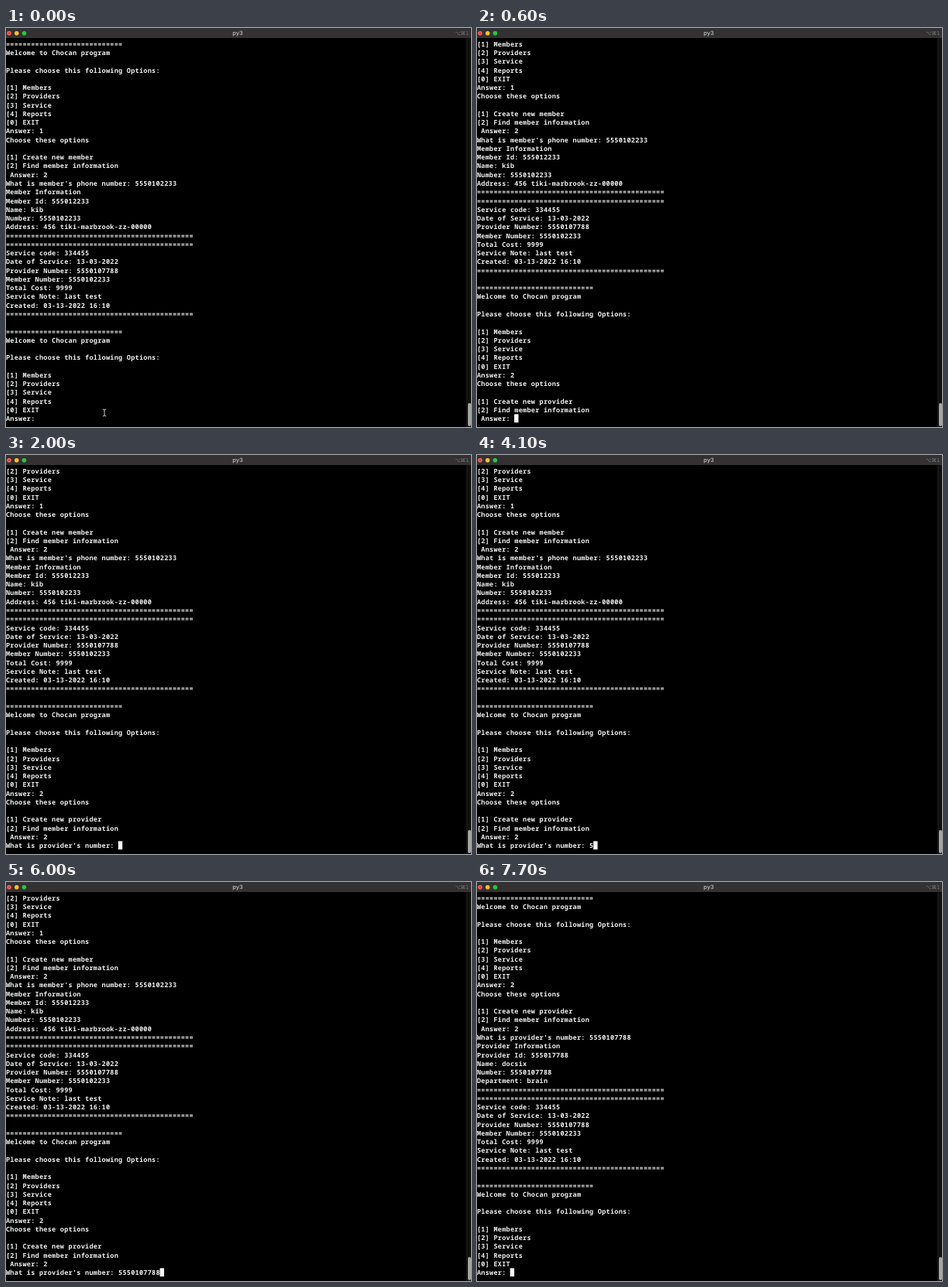
An HTML page that plays this animation: 600x516 px, repeating every 8 s.

```html
<!DOCTYPE html>
<html lang="en">
<head>
<meta charset="utf-8">
<title>Terminal session</title>
<style>
  html, body { margin: 0; width: 100%; height: 100%; overflow: hidden; background: #000; }
  svg { display: block; width: 100vw; height: 100vh; }
  text { text-rendering: geometricPrecision; white-space: pre; }
  #rows { font: 600 8.5px "Noto Sans Mono", "DejaVu Sans Mono", monospace; letter-spacing: 0.274px; fill: #f0f0f0; font-variant-ligatures: none; }
  .title { font: 600 7.4px Inter, Roboto, sans-serif; fill: #b4b4b4; }
  .keys { font: 6.4px "DejaVu Sans", sans-serif; fill: #7c7c7c; }
</style>
</head>
<body>
<svg viewBox="0 0 600 516">
  <rect width="600" height="516" fill="#000"/>
  <g id="rows"></g>
  <rect id="cursor" width="5.4" height="10.8" fill="#fff"/>
  <path id="pointer" d="M124.8 493 Q127 493 127 494.6 Q127 493 129.2 493 M127 494.6 V500.4 M124.8 502 Q127 502 127 500.4 Q127 502 129.2 502" fill="none" stroke="#cfcfcf"/>
  <rect x="594" y="13" width="6" height="503" fill="#101010"/>
  <rect x="594" y="13" width="0.7" height="503" fill="#262626"/>
  <rect x="596" y="485" width="4" height="30" rx="2" fill="#a6a6a6"/>
  <rect width="600" height="13" fill="#333132"/>
  <circle cx="4" cy="6.7" r="2.8" fill="#fe5f57"/>
  <circle cx="4" cy="6.7" r="0.9" fill="#a8322b"/>
  <circle cx="13.7" cy="6.7" r="2.8" fill="#febc2e"/>
  <circle cx="23.4" cy="6.7" r="2.8" fill="#28c840"/>
  <text class="title" x="299" y="9.2" text-anchor="middle">py3</text>
  <text class="keys" x="597" y="9.1" text-anchor="end">⌥⌘1</text>
</svg>
<script>
const LOOP = 8000, ROWS = 44, PITCH = 5.374, LEADING = 11.267;
const BOTTOM = 508.2;
const memberPhone = "5550102233", providerPhone = "5550107788";
const wide = "=".repeat(45);

const menu = [
  "=".repeat(28), "Welcome to Chocan program", "",
  "Please choose this following Options:", "",
  "[1] Members", "[2] Providers", "[3] Service", "[4] Reports", "[0] EXIT"
];
const submenu = kind => [
  "Choose these options", "", `[1] Create new ${kind}`, "[2] Find member information"
];
const service = [
  wide, wide, "Service code: 334455", "Date of Service: 13-03-2022",
  "Provider Number: " + providerPhone, "Member Number: " + memberPhone,
  "Total Cost: 9999", "Service Note: last test", "Created: 03-13-2022 16:10",
  wide, ""
];

// The log up to each prompt
const first = [
  ...menu, "Answer: 1", ...submenu("member"), " Answer: 2",
  "What is member's phone number: " + memberPhone,
  "Member Information", "Member Id: 555012233", "Name: kib",
  "Number: " + memberPhone, "Address: 456 tiki-marbrook-zz-00000",
  ...service, ...menu
];
const second = [...first, "Answer: 2", ...submenu("provider")];
const third = [...second, " Answer: 2"];
const fourth = [
  ...third, "What is provider's number: " + providerPhone,
  "Provider Information", "Provider Id: 555017788", "Name: docsix",
  "Number: " + providerPhone, "Department: brain",
  ...service, ...menu
];

// Each prompt: start, log above it, prompt text, typed answer, key times
const prompts = [
  { at: 0, log: first, ask: "Answer: ", answer: "2", keys: [400] },
  { at: 600, log: second, ask: " Answer: ", answer: "2", keys: [1400] },
  { at: 1900, log: third, ask: "What is provider's number: ", answer: providerPhone,
    keys: [4100, 4200, 4400, 4900, 5000, 5200, 5600, 5700, 5900, 6000] },
  { at: 6600, log: fourth, ask: "Answer: ", answer: "", keys: [] }
];
const cursorOff = [[0, 200], [1000, 1400], [1900, 2000], [3100, 3600], [7200, 7700]];
const POINTER_HIDES = 300;

const byId = id => document.getElementById(id);
const rows = Array.from({ length: ROWS }, (_, i) => {
  const row = document.createElementNS("http://www.w3.org/2000/svg", "text");
  row.setAttribute("x", 0);
  row.setAttribute("y", BOTTOM - (ROWS - 1 - i) * LEADING);
  return byId("rows").appendChild(row);
});
const show = (el, on) => el.setAttribute("visibility", on ? "visible" : "hidden");

function draw(t) {
  const { log, ask, answer, keys } = prompts.findLast(p => t >= p.at);
  const line = ask + answer.slice(0, keys.filter(k => t >= k).length);
  const lines = [...log, line].slice(-ROWS);
  rows.forEach((row, i) => {
    if (row.textContent !== lines[i]) row.textContent = lines[i];
  });
  const cursor = byId("cursor");
  cursor.setAttribute("x", line.length * PITCH - 0.3);
  cursor.setAttribute("y", BOTTOM - 8.8);
  show(cursor, !cursorOff.some(([from, to]) => t >= from && t < to));
  show(byId("pointer"), t < POINTER_HIDES);
}

const start = performance.now();
function tick() {
  draw((performance.now() - start) % LOOP);
  requestAnimationFrame(tick);
}
tick();
</script>
</body>
</html>
```
